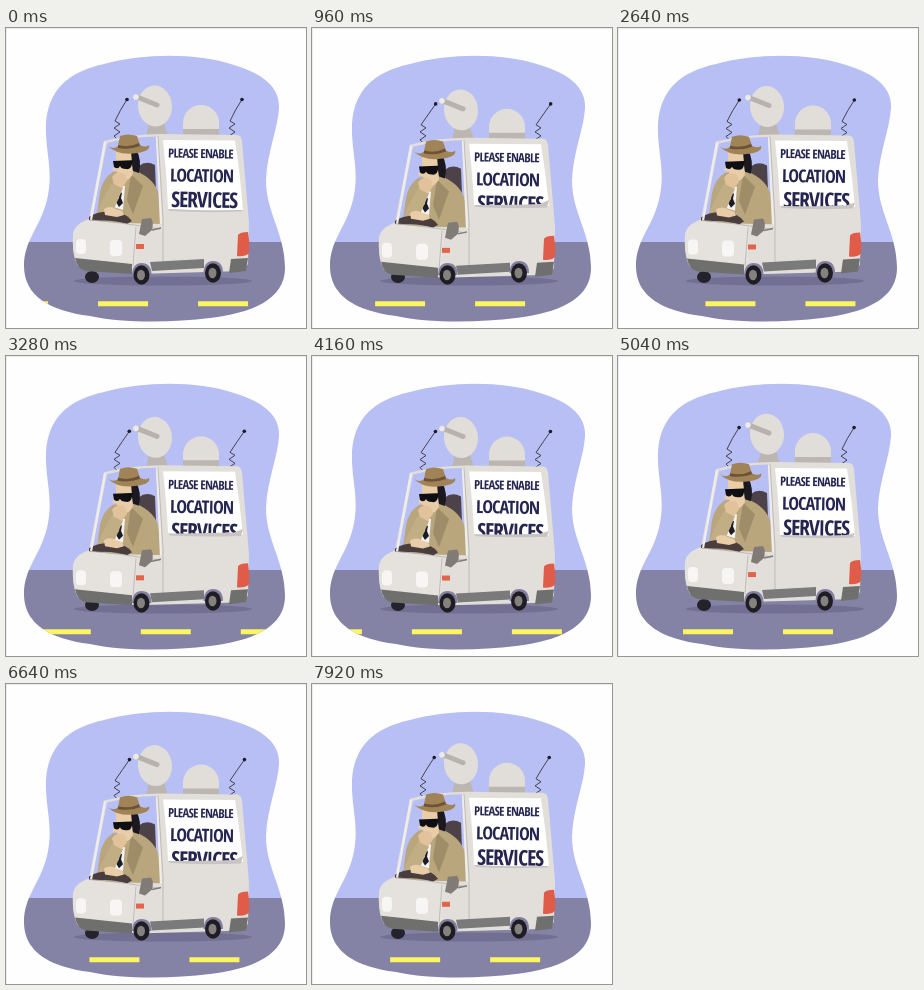
These frames come from a looping animation (300 px wide and 300 px high, 8 s). An HTML page:

```html
<!DOCTYPE html>
<html lang="en">
<head>
<meta charset="utf-8">
<title>Surveillance van</title>
<style>
html, body { margin: 0; width: 100%; height: 100%; overflow: hidden; background: #fefefe; }
svg { display: block; width: 100vw; height: 100vh; }
text {
  font-family: "Open Sans Condensed", "Roboto Condensed", "Liberation Sans Narrow", Roboto, sans-serif;
  font-stretch: condensed; font-weight: 800; letter-spacing: -.05em; fill: #252550;
}
.line { fill: none; stroke: #45424c; stroke-width: 1; stroke-linejoin: round; }
.seam { fill: none; stroke: #b5b1ae; stroke-width: .8; }
</style>
</head>
<body>
<svg viewBox="0 0 300 300">
  <defs>
    <clipPath id="blob"><path d="M40 96C42 62 62 44 98 36C140 25 190 25 228 37C258 46 274 60 273 80C272 100 261 125 260 152C260 185 279 205 279 240C279 272 245 285 204 290C165 295 115 295 84 288C44 283 18 268 18 238C18 212 34 200 41 172C48 142 39 125 40 96Z"/></clipPath>
    <clipPath id="cloth"><path id="clothEdge"/></clipPath>
    <clipPath id="glass"><path d="M98 100L151 100L156 196L84 194Z"/></clipPath>
  </defs>
  <path d="M0 .5H300M.5 0V300" stroke="#ececec"/>
  <g clip-path="url(#blob)">
    <path fill="#b7bff5" d="M0 0H300V214H0Z"/>
    <path fill="#8482a5" d="M0 214H300V300H0Z"/>
    <path id="dashes" d="M0 275.8H500" stroke="#fbf65f" stroke-width="5" stroke-dasharray="50 50"/>
  </g>
  <ellipse cx="157" cy="253" rx="89" ry="4.5" fill="#736f93"/>
  <ellipse cx="86" cy="249" rx="7" ry="6" fill="#24222a"/>

  <g id="body">
    <g id="aerials"></g>
    <path fill="#bbb6b0" d="M140 108L143 95H158L162 108Z"/>
    <ellipse cx="149" cy="78" rx="17" ry="20.5" fill="#e1ded9" transform="rotate(-5 149 78)"/>
    <path d="M131 69L151 77" stroke="#b8b2ac" stroke-width="5" stroke-linecap="round"/>
    <circle cx="130" cy="69" r="2.8" fill="#eeeae6"/>
    <path fill="#e1ded9" d="M177 104V95A18 18 0 0 1 213 95V106H177Z"/>
    <path fill="#bbb6b0" d="M177 101H213V108H177Z"/>

    <path fill="#e2dfda" d="M98 113Q125 106 156 106L231 107Q235 107 236 113L243 195L242 236L237 243L130 246L72 238Q66 229 67 207Q68 196 83 191Z"/>
    <path fill="#b7bff5" d="M101 115Q125 109 150 108.5L155 195L86 191Z"/>
    <g clip-path="url(#glass)">
      <path fill="#4d4247" d="M133 138Q140 132 149 137L151 189H134Z"/>
      <g id="driver">
        <path fill="#b9a67d" d="M90 194L94 164Q97 150 107 144L130 143Q149 151 153 167L155 198H94Z"/>
        <path fill="#9f8c68" d="M125 146L137 158L127 186L121 172Z"/>
        <path fill="#f4f2f0" d="M109 157L119 158L117 182L107 179Z"/>
        <path fill="#1d1b25" d="M112 163L116 165L115 170L117 175L113 179L110 174L113 170Z"/>
        <path fill="#c2ae85" d="M91 184Q101 162 108 152L117 160L105 188Z"/>
        <path fill="#1b191f" d="M115 121H130Q136 132 133 145L127 143Z"/>
        <path fill="#e9cda8" d="M110 123H125L127 146Q121 156 113 151L111 143L106 142L110 134Z"/>
        <path fill="#e2c29b" d="M106 149Q111 142 119 146L121 153L116 160L108 156Z"/>
        <path fill="#0f0e13" d="M107 133L131 132V135L126 136Q125 142 120 141Q115 141 114 138Q112 142 108 139Z"/>
        <ellipse cx="129" cy="135" rx="2.8" ry="5" fill="#1b191f"/>
        <path fill="#a08356" d="M102 118Q108 122 112 118L114 108Q122 105 131 108L134 117Q140 120 143 117Q145 123 131 125Q112 128 102 118Z"/>
        <path fill="#6c5335" d="M112 117Q123 120 133 115L134 118Q124 122 112 120Z"/>
      </g>
    </g>
    <path fill="#4a3d3d" d="M83 189Q91 183 107 184Q121 185 126 193L121 196Q103 190 83 194Z"/>
    <path fill="#e9cda8" d="M98 181Q104 177 110 181L116 183L118 187L111 189L99 187Z"/>
    <path d="M99 114L85 192M151 109L155 196" stroke="#efedea" stroke-width="2.2"/>
    <path fill="#e5e2dd" d="M83 192Q106 194 132 198L130 238L72 232Q66 228 67 207Q68 196 83 192Z"/>
    <path class="seam" d="M152 108L157 190L157 236M84 192Q112 194 154 201M130 199L127 238"/>
    <path fill="#817b77" d="M136 191L145 190Q148 194 146 202L139 208L133 206Z"/>
    <path d="M146 202L155 200" stroke="#817b77" stroke-width="1.5"/>
    <rect x="70" y="211" width="10" height="15" rx="4" fill="#f7f6f4"/>
    <rect x="104" y="212" width="12" height="16" rx="4" fill="#f7f6f4"/>
    <rect x="130" y="216" width="8" height="5" fill="#e2644a"/>
    <path fill="#6f6f6e" d="M69 230L126 236V246L80 243Q71 241 69 230Z"/>
    <path fill="#7b7a7b" d="M144 234L198 231V240L146 243Z"/>
    <path fill="#6f6f6e" d="M225 231L242 230L240 243L223 245Z"/>
    <path fill="#e05c49" d="M232 207Q234 204 242 204Q244 214 243 225Q239 229 231 228Z"/>

    <path id="sheet" fill="#fff"/>
    <g clip-path="url(#cloth)" text-anchor="middle" id="sign"></g>
    <path id="roll" fill="#c8c4c4"/>
  </g>
  <g id="wheels"></g>
</svg>
<script>
const $ = id => document.getElementById(id);
const DASH_SPEED = 0.074, LOOP = 8000;

const aerial = x => `<path class="line" d="M${x + 4} 112L${x} 108L${x + 6} 104L${x} 100L${x + 6} 96L${x + 1} 93"/>
  <path class="line rod" data-x="${x}"/><circle class="tip" data-x="${x}" r="1.8" fill="#1d1b25"/>`;
$('aerials').innerHTML = aerial(108) + aerial(223);

$('wheels').innerHTML = [[135.5, 247], [207, 245]].map(([x, y]) => `
  <path fill="#85809f" d="M${x - 9.5} ${y}Q${x - 9} ${y - 12} ${x} ${y - 12}Q${x + 10} ${y - 12} ${x + 10} ${y}Z"/>
  <ellipse cx="${x}" cy="${y}" rx="8" ry="9.7" fill="#1f1d24"/>
  <ellipse cx="${x - .5}" cy="${y}" rx="4" ry="5.3" fill="#85817f"/>`).join('');

// One font size per line, chosen so that the line fits the sign
const lines = [['PLEASE ENABLE', 194.5, 130, 65, 15], ['LOCATION', 195.5, 154, 63, 23], ['SERVICES', 198, 179.5, 66, 23]];
$('sign').innerHTML = lines.map(([s, x, y]) =>
  `<text x="${x}" y="${y}" font-size="100" transform="rotate(1 ${x} ${y})">${s}</text>`).join('');
document.querySelectorAll('text').forEach((el, i) => {
  const [, , , width, max] = lines[i];
  el.setAttribute('font-size', Math.min(max, 100 * width / el.getComputedTextLength()));
});

// How far the sign's lower edge is rolled up: [time, amount]
const lifts = [[0, 0], [960, 1], [2000, .6], [3280, .9], [5040, .5], [6640, 1], [7920, 0], [8000, 0]];
function liftAt(t) {
  const i = lifts.findIndex(k => k[0] > t);
  const [t0, a] = lifts[i - 1], [t1, b] = lifts[i];
  const p = (t - t0) / (t1 - t0);
  return a + (b - a) * p * p * (3 - 2 * p);
}

function draw(t) {
  const bounce = Math.abs(Math.sin(Math.PI * t / 2500)) ** 1.25;
  const dy = 4.2 * bounce, sway = 2.9 * bounce;
  $('body').setAttribute('transform', `translate(0 ${dy})`);
  $('driver').setAttribute('transform', `translate(0 ${1.8 * bounce})`);
  $('dashes').setAttribute('transform', `translate(${(92 + DASH_SPEED * t) % 100 - 100} 0)`);

  const tipY = 71.5 + .6 * bounce;
  document.querySelectorAll('.rod').forEach(el => {
    const x = +el.dataset.x;
    el.setAttribute('d', `M${x + 1} 93Q${x + 6 + sway} 82 ${x + 13 + sway} ${tipY}`);
  });
  document.querySelectorAll('.tip').forEach(el => {
    el.setAttribute('cx', +el.dataset.x + 13 + sway);
    el.setAttribute('cy', tipY);
  });

  const lift = liftAt(t), y = 182 - 4 * lift - dy;
  const sheet = `M157 112L229 112.5Q234 145 237 ${y}Q200 ${y + 1.5} 162 ${y - 1}Q161 147 157 112Z`;
  $('sheet').setAttribute('d', sheet);
  $('clothEdge').setAttribute('d', sheet);
  $('roll').setAttribute('d',
    `M162 ${y - 1}Q200 ${y + 1 - 2 * lift} 228 ${y - 2 * lift}L237 ${y - 6 * lift}L235 ${y + 1.5}Q195 ${y + 3} 164 ${y + 1}Z`);
}

const start = performance.now();
function tick() {
  draw((performance.now() - start) % LOOP);
  requestAnimationFrame(tick);
}
tick();
</script>
</body>
</html>
```
